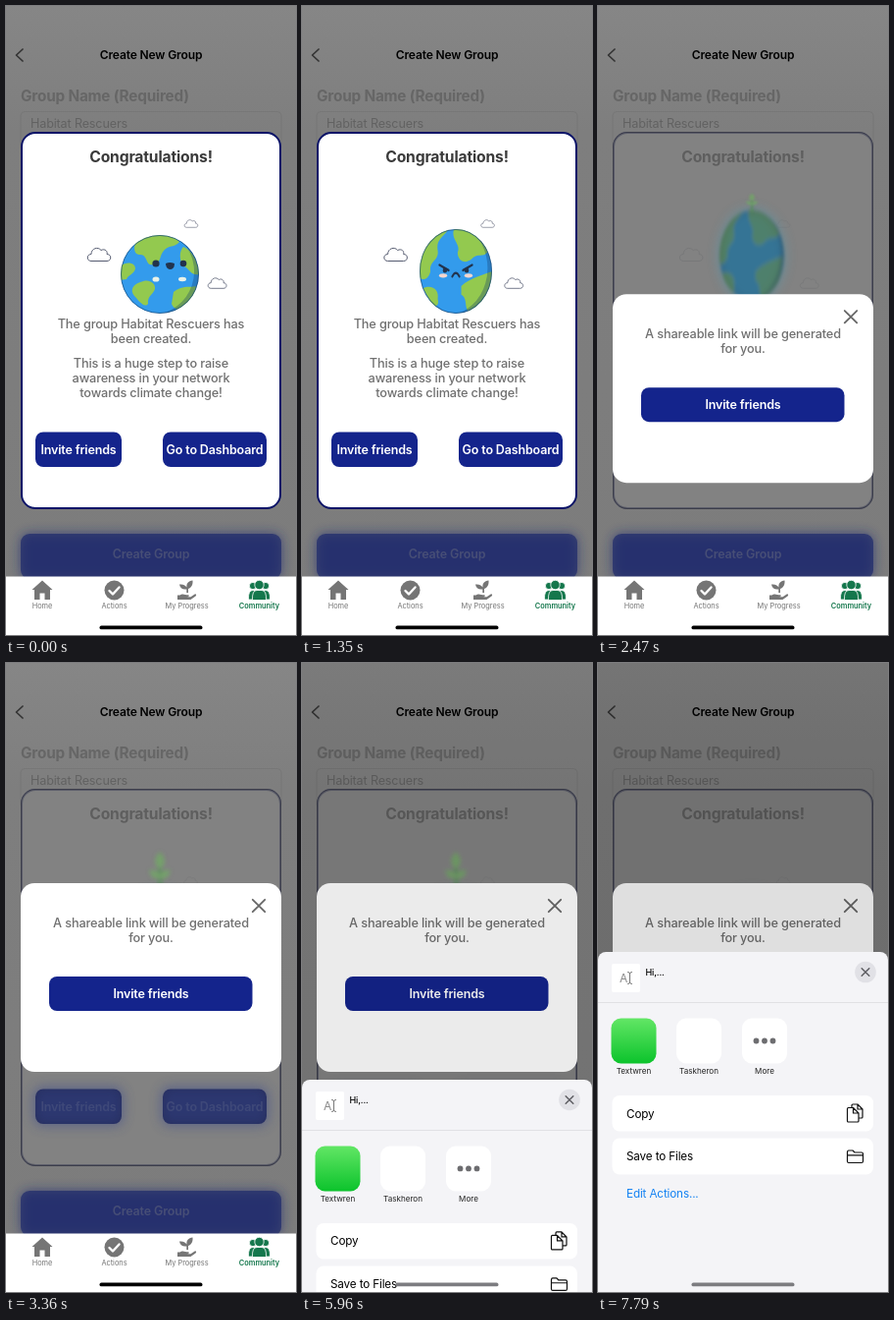
An HTML page that plays this animation: 296x640 px, repeating every 8 s.

```html
<!DOCTYPE html>
<html lang="en">
<head>
<meta charset="utf-8">
<title>Create New Group</title>
<style>
html, body { margin: 0; width: 100%; height: 100%; overflow: hidden; background: #808080; }
svg { display: block; width: 296px; height: 640px; }
text { font-family: Inter, "Open Sans", sans-serif; letter-spacing: -.012em; }
.mid { text-anchor: middle; }
.semi { font-weight: 600; }
.bold { font-weight: 700; }
.btn { font-weight: 600; font-size: 12.5px; fill: #fff; text-anchor: middle; }
.body { font-weight: 500; font-size: 12.75px; fill: #707070; text-anchor: middle; }
.tab { font-size: 7.4px; fill: #757575; text-anchor: middle; letter-spacing: 0; }
.app { font-size: 8.1px; fill: #222; text-anchor: middle; letter-spacing: 0; }
.row { font-size: 11.7px; fill: #000; }
.line { fill: none; stroke-linecap: round; stroke-linejoin: round; }
</style>
</head>
<body>
<svg viewBox="0 0 296 640">
  <defs>
    <clipPath id="globe"><circle r="40"/></clipPath>
    <filter id="halo" x="-40%" y="-60%" width="180%" height="220%"><feGaussianBlur stdDeviation="6"/></filter>
    <filter id="soft" x="-20%" y="-20%" width="140%" height="140%"><feGaussianBlur stdDeviation="2"/></filter>
    <linearGradient id="page" x2="0" y2="1">
      <stop offset="0" stop-color="#868686"/><stop offset=".2" stop-color="#7e7e7e"/><stop offset="1" stop-color="#7c7c7c"/>
    </linearGradient>
    <linearGradient id="green" x2="0" y2="1">
      <stop offset="0" stop-color="#62e665"/><stop offset="1" stop-color="#0cc32c"/>
    </linearGradient>
    <path id="cloud" d="M4 16C-1 16-1 9 4 9C4 3 11 1 14 5C18 3 21 6 20 9C25 9 25 16 20 16Z" fill="#fff" stroke="#555b70" stroke-width="1"/>
    <path id="leaf" d="M0 0C-7-5-6-12 0-18C6-12 7-5 0 0Z"/>
  </defs>

  <!-- page -->
  <rect width="296" height="640" fill="url(#page)"/>
  <path class="line" d="M17 44L10.500 50L17 56" stroke="#333" stroke-width="1.700"/>
  <text class="mid semi" x="148" y="54" font-size="12.050">Create New Group</text>
  <text class="bold" x="15" y="97" font-size="15.300" fill="#666">Group Name (Required)</text>
  <rect x="15" y="107.500" width="266" height="40" rx="4" fill="none" stroke="#777"/>
  <text x="25" y="124" font-size="12.600" fill="#626262">Habitat Rescuers</text>
  <rect x="15" y="537" width="266" height="46" rx="9" fill="#232e74" opacity=".75" filter="url(#halo)"/>
  <rect x="15" y="537" width="266" height="46" rx="9" fill="#1f2a6c" opacity=".7"/>
  <text class="btn" x="148" y="562" style="fill:#474e76">Create Group</text>

  <!-- congratulations modal -->
  <rect x="16" y="129" width="264" height="382" rx="14" fill="#fff"/>
  <rect id="frame" x="16" y="129" width="264" height="382" rx="14" fill="none" stroke="#0b1468" stroke-width="2"/>
  <text id="title" class="mid bold" x="148" y="159" font-size="15.700" fill="#3a3a3a">Congratulations!</text>
  <g id="clouds">
    <use href="#cloud" transform="translate(83 243.500)"/>
    <use href="#cloud" transform="translate(182 216) scale(.58)"/>
    <use href="#cloud" transform="translate(206 274.500) scale(.8)"/>
  </g>
  <g id="earth">
    <g clip-path="url(#globe)">
      <circle r="40" fill="#339bec"/>
      <g id="landA" fill="#93c94f">
        <path d="M-24-34C-10-42 12-42 20-33C16-27 8-30 4-24C-1-18 2-12-7-10C-15-8-12-20-20-20C-27-20-27-28-24-34Z"/>
        <path d="M24-28C34-24 40-10 40 0C32 2 30-6 25-8C19-14 20-24 24-28Z"/>
        <path d="M-41-8C-34-14-25-12-25-6C-26 0-32 0-34 5L-41 6Z"/>
        <path d="M-20 8C-12 4-4 8-5 15C-7 21-13 22-12 30C-16 35-22 26-26 22C-31 16-27 10-20 8Z"/>
        <path d="M14 18C24 10 32 14 37 12L34 32C24 40 14 36 12 30Z"/>
      </g>
      <g id="landB" fill="#93c94f">
        <path d="M-41-6C-36-26-26-38-8-40C-14-32-22-30-20-20C-18-10-30-10-28 0C-30 8-38 10-41 4Z"/>
        <path d="M-2-40C14-42 28-32 36-20C32-12 24-18 18-12C10-6 2-10 2-18C6-26-6-30-2-40Z"/>
        <path d="M6 14C16 6 28 4 40 0C40 20 30 34 16 40C8 34 14 26 6 22Z"/>
        <path d="M-36 16C-26 12-18 18-20 26C-18 32-22 34-26 32Z"/>
      </g>
      <path d="M20-36A41 41 0 0 1-6 41A44 44 0 0 0 20-36Z" fill="#123a66" opacity=".32"/>
      <g id="happy" fill="#22334d">
        <ellipse cx="-14" cy="5" rx="3.500" ry="2.600" fill="#e9f2e8"/>
        <ellipse cx="13" cy="5" rx="4" ry="2.200" fill="#e9f2e8"/>
        <circle cx="-14" cy="-11" r="3.600"/><circle cx="14" cy="-11" r="3.300"/>
        <path d="M-4-11Q0-13 5-11Q5-5 0-5Q-4-6-4-11Z"/>
      </g>
      <g id="angry">
        <ellipse cx="-14" cy="4" rx="4.500" ry="2" fill="#f3d6cf"/>
        <ellipse cx="14" cy="4" rx="4.500" ry="2" fill="#f3d6cf"/>
        <g class="line" stroke="#22334d" stroke-width="2.200">
          <path d="M-18-6L-8-1M18-6L8-1"/>
          <path d="M-4 5Q0-2 4 5" stroke-width="2"/>
        </g>
        <circle cx="-12" cy="-1" r="2.400" fill="#22334d"/><circle cx="12" cy="-1" r="2.400" fill="#22334d"/>
      </g>
    </g>
    <circle id="rim" r="39.500" fill="none" stroke="#1c4a78"/>
  </g>
  <text class="body" x="148" y="328">The group Habitat Rescuers has</text>
  <text class="body" x="148" y="343">been created.</text>
  <text class="body" x="148" y="368">This is a huge step to raise</text>
  <text class="body" x="148" y="383">awareness in your network</text>
  <text class="body" x="148" y="398">towards climate change!</text>
  <rect x="30" y="433.500" width="88" height="35.500" rx="8" fill="#14248c"/>
  <rect x="160" y="433.500" width="106" height="35.500" rx="8" fill="#14248c"/>
  <text id="invite" class="btn" x="74" y="456">Invite friends</text>
  <text id="dash" class="btn" x="213" y="456">Go to Dashboard</text>
  <rect id="shade" x="15" y="128" width="266" height="384" rx="15" fill="#2f2f2f"/>

  <!-- soft colour left around dimmed parts -->
  <g id="glow" filter="url(#halo)">
    <ellipse id="aura" rx="42" ry="42" fill="#3fa6c8" opacity=".7"/>
    <g fill="#36448c">
      <rect x="28" y="431" width="92" height="40" rx="9"/>
      <rect x="158" y="431" width="110" height="40" rx="9"/>
    </g>
  </g>
  <g id="sprout" filter="url(#soft)">
    <path class="line" d="M0 2Q1-10 0-24" stroke="#4f8f52" stroke-width="4"/>
    <g fill="#6fae62">
      <use href="#leaf" transform="translate(0 -23)"/>
      <use href="#leaf" transform="translate(0 -14) rotate(-52) scale(.75)"/>
      <use href="#leaf" transform="translate(0 -14) rotate(52) scale(.75)"/>
    </g>
  </g>

  <!-- link dialog, drawn from its own top edge -->
  <g id="dialog">
    <rect x="15" width="266" height="192" rx="14" fill="#fff"/>
    <path class="line" d="M251.800 16.800L264.200 29.200M264.200 16.800L251.800 29.200" stroke="#666" stroke-width="1.800"/>
    <text class="body" x="148" y="44.500">A shareable link will be generated</text>
    <text class="body" x="148" y="59.500">for you.</text>
    <rect x="44" y="95" width="207.500" height="35" rx="8" fill="#14248c"/>
    <text id="send" class="btn" x="148" y="117">Invite friends</text>
  </g>

  <!-- tab bar -->
  <rect y="580.500" width="296" height="60" fill="#fff"/>
  <g fill="#757575">
    <path d="M37 584.500L47.500 594H45V604H39.500V597.500H34.500V604H29V594H26.500Z"/>
    <circle cx="110.500" cy="594.500" r="10"/>
    <path class="line" d="M105.500 595L109 598.500L115.500 591.500" stroke="#fff" stroke-width="2.400"/>
    <path d="M184.300 597V593.500C180 594 177.500 592 177 588.500C181 588 183.500 589.500 184.500 591.500C184 587.500 186 585 190.500 584.500C191 589 189 592 186 593V597Z"/>
    <path d="M175 599.500H177.500C180.500 597 183 599.500 186.500 599.300Q187.500 601 185 601.200H188.500L193 598.300Q195 598.800 193.500 600.500L188.500 604H175Z"/>
  </g>
  <g fill="#14774c" stroke="#fff" stroke-width=".8">
    <circle cx="252" cy="590" r="3.600"/><circle cx="265" cy="590" r="3.600"/>
    <path d="M247.500 604Q247 594.500 252 594.500Q256 594.500 256 604ZM261 604Q261 594.500 265 594.500Q270 594.500 269.500 604Z"/>
    <path d="M251.500 604.500Q251 594.500 256 594.500H261Q266 594.500 265.500 604.500Z"/>
    <circle cx="258.500" cy="589" r="4.700"/>
  </g>
  <text class="tab" x="37" y="612.500">Home</text>
  <text class="tab" x="110.500" y="612.500">Actions</text>
  <text class="tab" x="184.500" y="612.500">My Progress</text>
  <text class="tab semi" x="258.500" y="612.500" style="fill:#14774c">Community</text>

  <rect id="dim" width="296" height="640"/>

  <!-- share sheet, drawn from its own top edge -->
  <g id="sheet">
    <rect width="296" height="370" rx="8" fill="#f4f4f7"/>
    <rect x="14" y="12" width="29" height="29" rx="2" fill="#fff"/>
    <text x="22" y="31" font-size="12" fill="#8a8a8a">A</text>
    <path class="line" d="M30.500 20.500Q32.500 20.500 32.500 22Q32.500 20.500 34.500 20.500M32.500 22V31M30.500 32.500Q32.500 32.500 32.500 31Q32.500 32.500 34.500 32.500" stroke="#777"/>
    <text x="48.500" y="24" font-size="9" font-weight="500">Hi,...</text>
    <circle cx="273" cy="20.500" r="10.800" fill="#e1e1e6"/>
    <path class="line" d="M269.200 16.700L276.800 24.300M276.800 16.700L269.200 24.300" stroke="#5f5f64" stroke-width="1.500"/>
    <path d="M0 51.500H296" stroke="#dcdce0" stroke-width=".8"/>
    <rect x="13.500" y="67.500" width="46" height="46" rx="10" fill="url(#green)"/>
    <rect x="80" y="67.500" width="46" height="46" rx="10" fill="#fff"/>
    <rect x="147" y="67.500" width="46" height="46" rx="10" fill="#fff"/>
    <g fill="#6d6d70"><circle cx="161.500" cy="90.500" r="2.900"/><circle cx="170" cy="90.500" r="2.900"/><circle cx="178.500" cy="90.500" r="2.900"/></g>
    <text class="app" x="36.500" y="124">Textwren</text>
    <text class="app" x="103" y="124">Taskheron</text>
    <text class="app" x="170" y="124">More</text>
    <rect x="14.500" y="146" width="266.500" height="36.500" rx="7.500" fill="#fff"/>
    <rect x="14.500" y="189.500" width="266.500" height="37" rx="7.500" fill="#fff"/>
    <text class="row" x="29" y="168.500">Copy</text>
    <text class="row" x="29" y="212">Save to Files</text>
    <text class="row" x="29" y="250" style="fill:#1482f2">Edit Actions...</text>
    <g class="line" stroke="#111" stroke-width="1.200">
      <path d="M259 158V156Q259 155 260 155H265L270 160V168Q270 169 269 169H266.500M265 155V160H270"/>
      <path d="M255.500 158.500H260.500L266 164V172Q266 173 265 173H255.500Q254.500 173 254.500 172V159.500Q254.500 158.500 255.500 158.500ZM260.500 158.500V164H266"/>
      <path d="M254.500 203.500Q254.500 202 256 202H260L262 204H269Q270.500 204 270.500 205.500V213Q270.500 214.500 269 214.500H256Q254.500 214.500 254.500 213ZM254.500 206.800H270.500"/>
    </g>
  </g>
  <rect id="home" x="95.500" y="630.600" width="105" height="3.700" rx="1.850"/>
</svg>
<script>
const LOOP = 8000;
const el = {};
document.querySelectorAll("svg [id]").forEach(n => el[n.id] = n);

const ramp = (t, a, b) => Math.min(1, Math.max(0, (t - a) / (b - a)));
const smooth = x => x * x * (3 - 2 * x);
const easeOut = x => 1 - (1 - x) ** 3;
const mix = (a, b, x) => a + (b - a) * x;
const move = (n, x, y, sx = 1, sy = sx) =>
  n.setAttribute("transform", `translate(${x} ${y}) scale(${sx} ${sy})`);
const fade = (n, o) => n.setAttribute("opacity", o);

// eased value through [time, value] stops
function track(t, stops) {
  let i = 1;
  while (i < stops.length - 1 && t > stops[i][0]) i++;
  const [a, u] = stops[i - 1], [b, v] = stops[i];
  return mix(u, v, smooth(ramp(t, a, b)));
}

// label opacity while a button is held down
const press = (t, down, up) => 1 - .72 * (ramp(t, down, down + 120) - ramp(t, up, up + 150));

function drawEarth(t, shade) {
  const cy = track(t, [[0, 273], [400, 273], [1300, 270], [1400, 270], [1800, 276], [2150, 276], [2460, 254], [2900, 273]]);
  const rx = track(t, [[0, 40], [700, 40], [1300, 37], [2120, 35], [2470, 33], [2950, 40]]);
  const ry = track(t, [[0, 40], [700, 40], [1300, 43], [2120, 45], [2470, 46], [2950, 40]]);
  for (const n of [el.earth, el.aura]) move(n, 157, cy, rx / 40, ry / 40);
  el.earth.setAttribute("filter", shade > .5 ? "url(#soft)" : "none");

  const spin = smooth(ramp(t, 0, 1250)) * 84;
  const sway = track(t, [[1350, 0], [2120, -3], [2900, 0]]);
  move(el.landA, spin, 0);
  move(el.happy, spin + 10, 0);
  move(el.landB, spin - 84 + sway, 0);
  move(el.angry, spin - 84 + sway, 0);
  fade(el.angry, 1 - shade);
  fade(el.rim, .7 * (1 - shade));

  const grow = track(t, [[2200, 0], [2470, .42], [3200, 1]]);
  move(el.sprout, 157, cy - ry, mix(.25, 1, grow), grow);
  fade(el.sprout, grow ? .7 * (1 - ramp(t, 6000, 6290)) : 0);
  move(el.clouds, .6 * Math.sin(t / 1350 * Math.PI / 2), 0);
  fade(el.clouds, 1 - .85 * shade);
}

function draw(t) {
  const shade = smooth(ramp(t, 2230, 2460));
  drawEarth(t, shade);
  fade(el.shade, .6 * shade);
  fade(el.glow, .5 * shade);
  fade(el.title, 1 - .55 * shade);
  fade(el.frame, 1 - .6 * shade);
  fade(el.dash, 1 - .6 * shade);
  fade(el.invite, press(t, 1900, 2200) * (1 - .6 * shade));
  fade(el.send, press(t, 5230, 5500));

  move(el.dialog, 0, mix(640, 224, easeOut(ramp(t, 2246, 2746))));

  const rise = easeOut(ramp(t, 5780, 6430));
  fade(el.dim, .125 * rise);
  move(el.sheet, 0, mix(640, 294, rise));
  el.home.setAttribute("fill", rise > .1 ? "#7c7c80" : "#000");
}

function tick() {
  draw(performance.now() % LOOP);
  requestAnimationFrame(tick);
}
tick();
</script>
</body>
</html>
```
